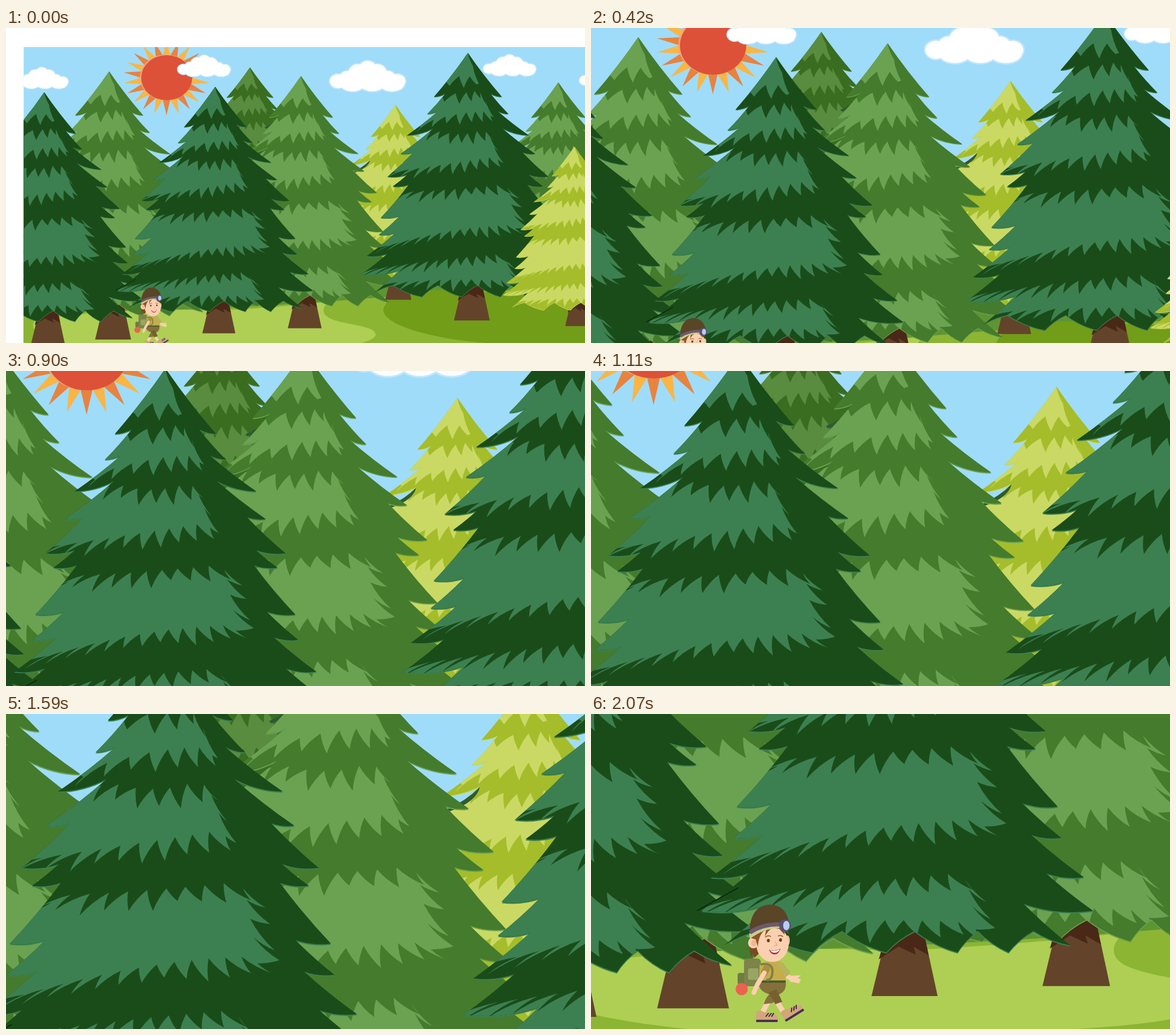
Write an HTML page that moves like this. It is 999 px wide and 545 px high and loops after 2100 ms.

```html
<!DOCTYPE html>
<html lang="en">
<head>
<meta charset="utf-8">
<title>Forest walk</title>
<style>
html, body { margin: 0; width: 100%; height: 100%; overflow: hidden; background: #fff; }
svg { display: block; width: 100%; height: 100%; }
</style>
</head>
<body>
<svg id="stage" viewBox="0 0 999 545" preserveAspectRatio="none"></svg>
<script>
const LOOP = 2100, STEP = 30, ZOOM_END = 1500;
const CENTER = [499.5, 272.5], PAN = [306, -296];

let seed = 7;
const random = () => (seed = (seed * 16807) % 2147483647) / 2147483647;
const mix = (a, b, u) => a + (b - a) * u;
const move = ([x, y]) => `M${x} ${y}`;

// Joins points with shallow curves; even and odd segments bend to opposite sides.
function jag(points, bends) {
  return points.slice(1).map(([x, y], i) => {
    const [x0, y0] = points[i], bend = bends[i % 2];
    const cx = (x0 + x) / 2 - (y - y0) * bend, cy = (y0 + y) / 2 + (x - x0) * bend;
    return `Q${cx.toFixed(1)} ${cy.toFixed(1)} ${x.toFixed(1)} ${y.toFixed(1)}`;
  }).join('');
}

// Branch tips of one side: half width, height below the apex, depth of the notch beneath.
const branches = [[108, 140, 36], [129, 195, 34], [194, 263, 84], [214, 322, 40],
  [256, 395, 63], [239, 426, 50], [277, 526, 61], [283, 580, 52], [322, 648, 65],
  [338, 706, 120], [299, 766, 0]];

function outline() {
  const side = [[0, 0]];
  for (const [x, y, inset] of branches) {
    side.push([x, y]);
    if (inset) side.push([x - inset, y - inset * (y < 300 ? 0.26 : 0.1)]);
  }
  const hem = [[299, 766]];
  for (const x of [192, 104, -19, -146, -299]) {
    hem.push([mix(hem[hem.length - 1][0], x, 0.6), 741], [x, x < -200 ? 766 : 778]);
  }
  const mirrored = side.map(([x, y]) => [-x, y]).reverse();
  return move([0, 0]) + jag(side, [0.03, -0.12]) + jag(hem, [-0.1, 0.1]) + jag(mirrored, [0.03, -0.12]);
}

// Needles hanging from the arc a-m-b, fanning away from the middle of the tree.
function fringe(a, m, b) {
  const chord = Math.hypot(b[0] - a[0], b[1] - a[1]);
  const count = chord < 60 ? 0 : Math.round(chord / 32);
  const at = (u, k) => mix(mix(a[k], 2 * m[k] - (a[k] + b[k]) / 2, u),
    mix(2 * m[k] - (a[k] + b[k]) / 2, b[k], u), u);
  const points = [a];
  for (let i = 0; i < count; i++) {
    const u = (i + 0.5) / count, next = (i + 1) / count, length = 10 + 18 * random();
    points.push([at(u, 0) * 1.28, at(u, 1) + length]);
    if (next < 1) points.push([at(next, 0), at(next, 1) - 12]);
  }
  return jag([...points, b], [0.09, -0.09]);
}

// Lit zones: upper edge from left to right, then lower edge from right to left.
const zones = [
  [[0, 2], [8, 20], [16, 42], [35, 98], [-10, 85], [-65, 97]],
  [[-80, 142], [-5, 138], [40, 127], [72, 200], [-20, 204], [-150, 238]],
  [[-119, 252], [-30, 270], [58, 251], [95, 340], [-70, 366], [-258, 395]],
  [[-205, 455], [-40, 445], [125, 430], [150, 560], [-70, 582], [-322, 648]],
  [[-347, 708], [-110, 674], [117, 652], [135, 738], [-70, 735], [-295, 750]]
];
const lit = zones.map(([a, m, b, c, n, d]) => {
  const flank = [(b[0] + c[0]) / 2, (b[1] + c[1]) / 2];
  return move(a) + fringe(a, m, b) + fringe(b, flank, c) + fringe(c, n, d) +
    `L${d[0] - 60} ${(a[1] + d[1]) / 2}Z`;
}).join('');

const foliage = outline();
const pineShape = `<clipPath id="inside"><path d="${foliage}"/></clipPath><g id="pine">
  <path fill="#63442a" d="M-16 735H44L69.500 853.500H-44.500Z"/>
  <path fill="#4a2817" d="M-16 735H44L54 783 28 768 32 782 2 768-32 790Z"/>
  <path fill="var(--light)" transform="translate(0 2)" d="${foliage}"/>
  <path fill="var(--base)" d="${foliage}"/>
  <path fill="var(--light)" clip-path="url(#inside)" d="${lit}"/></g>`;

const tones = {
  dark: ['#1a4c1a', '#3c8051'],
  green: ['#457b2c', '#6aa252'],
  olive: ['#3a6d20', '#5a8c3f'],
  lime: ['#a5bd2a', '#cad964']
};
const pine = (x, y, size, tone) => `<use href="#pine" transform="translate(${x} ${y}) scale(${size / 2})"
  style="--base:${tones[tone][0]};--light:${tones[tone][1]}"/>`;
const leaf = (x, y) => `<path fill="#2f5a33" d="M${x} ${y}q16-7 28-19q-3 13-26 21z"/>`;

const ellipse = (cx, cy, rx, ry, fill) =>
  `<ellipse cx="${cx}" cy="${cy}" rx="${rx}" ry="${ry}" fill="${fill}"/>`;

function cloudShape() {
  let puffs = '';
  for (let i = 0; i < 7; i++) {
    const x = 16 + 17 * i, rise = Math.sin(Math.PI * i / 6) ** 2;
    puffs += ellipse(x, 38 - 14 * rise, 14 + 4 * rise, 12 + 9 * rise, '#fff');
    if (i % 2) puffs += ellipse(x + 8, 43, 21, 12.5, '#fff');
  }
  return `<g id="cloud"><g stroke="#c2e6fb" stroke-width="4">${puffs}</g>${puffs}</g>`;
}
const cloud = (x, y, size) => `<use href="#cloud" transform="translate(${x} ${y}) scale(${size})"/>`;

function sun() {
  const count = 22;
  let rays = '';
  for (let i = 0; i < count; i++) {
    rays += `<path d="M-6 36L0 65 6 36Z" fill="${i % 2 ? '#fab545' : '#e8833f'}"
      transform="scale(1.150 1) rotate(${i * 360 / count})"/>`;
  }
  return `<g transform="translate(277 86)">${rays}${ellipse(-0.8, -0.5, 45, 39.5, '#f4a67c')}
    ${ellipse(0.3, 0, 44, 39, '#dd5138')}</g>`;
}

const ground = `
  <path fill="#5f9433" d="M0 430H1040V620H0Z"/>
  <path fill="#8bb533" d="M0 489Q300 495 596 470T1040 455V620H0Z"/>
  <path fill="#aecf54" d="M50 505Q200 482 360 489Q470 484 560 473Q546 480 548 491C553 515 638 510 638 531
    Q632 550 512 557Q350 567 182 557Q40 542 47 512Z"/>
  <path fill="#729d18" d="M660 470Q700 448 800 455T1040 450V620H1000Q920 548 830 545C750 540 640 515 652 483Z"/>`;

const shoe = at => `<g transform="${at}"><path fill="#d2a679" d="M0-1V-15Q8-19 14-14L30-12Q38-10 37-1Z"/>
  <path stroke="#3c2a4a" stroke-width="2" d="M17-7l4-5m1 5 4-5m1 5 3-5"/>
  <path fill="#4a2d5a" d="M0-1H37V3H0Z"/></g>`;

const hiker = `<g transform="translate(96.750 284.250) scale(.5)" fill="none" stroke-linecap="round">
  <rect x="253" y="448" width="20" height="20" rx="4" fill="#6f7a45"/>
  <rect x="264" y="423" width="29" height="48" rx="6" fill="#7d8349"/>
  <rect x="271" y="440" width="18" height="20" rx="3" fill="#97a565"/>
  ${ellipse(260, 476, 10.5, 10.5, '#ec6250')}
  <path stroke="#fbd0b0" stroke-width="9" d="M306 497L297 514M320 496L332 516"/>
  ${shoe('translate(285 530)')}${shoe('translate(335 530) rotate(-32)')}
  <path fill="#85703c" d="M289 464H336Q338 480 323 486L314 500 298 502Q303 488 308 485Q289 480 289 464Z"/>
  <path fill="#75612f" d="M306 482L320 476 330 498 318 502Z"/>
  <path stroke="#fbd0b0" stroke-width="8" d="M334 452L347 458"/>
  <path fill="#fbd0b0" d="M342 453L362 452 357 457 362 459 359 466 343 463Z"/>
  <path fill="#c5ad4c" d="M291 433Q312 423 331 430L344 449 336 455V463H290Z"/>
  <path fill="#b8b35c" d="M326 428L344 446 336 455 322 436Z"/>
  <path fill="#4c5a2a" d="M289 461H336V465H289Z"/>
  <path stroke="#7d8349" stroke-width="4" d="M294 433Q313 430 313 445T304 460"/>
  <path stroke="#a98f42" stroke-width="12" d="M303 440L299 448"/>
  <path stroke="#fbd0b0" stroke-width="8" d="M299 448L287 468 281 482"/>
  <path fill="#7a4a22" d="M275 378Q270 400 276 420L280 414 282 422 292 412V376Z"/>
  ${ellipse(339, 392, 4, 9, '#f4bf9c')}${ellipse(313, 398, 28, 31, '#fbd0b0')}
  ${ellipse(280, 396, 9, 9.5, '#fbd0b0')}${ellipse(281, 396, 4.5, 5.5, '#f0b792')}
  <path fill="#8a5628" d="M277 388Q285 363 309 364Q335 360 342 382L333 372 334 382 325 372 315 370Q306 372 300 386L302 373Q289 380 288 403L284 390Z"/>
  <path fill="#c9cf8c" d="M273 380Q305 360 335 366L335 371Q303 367 274 389Z"/>
  <path fill="#5a4526" d="M274 376C274 346 288 330 309 330S340 345 342 364Q304 358 274 376Z"/>
  <path stroke="#6e5a6e" stroke-width="7" stroke-linecap="butt" d="M274 378Q304 359 342 366"/>
  ${ellipse(335, 366, 10.5, 10.5, '#565079')}${ellipse(337, 366, 5.5, 8, '#b9cdf0')}
  ${ellipse(306, 392, 2.6, 3, '#69401f')}${ellipse(327, 391, 2.6, 3, '#69401f')}
  <path stroke="#8a5628" stroke-width="1.500" d="M301 386Q306 382 310 385M323 384Q328 382 331 385"/>
  <path stroke="#e8ac88" stroke-width="1.500" d="M318 394L321 400 316 401"/>
  <path fill="#b92f30" d="M307 408Q317 411 327 406Q324 416 316 416Q310 415 307 408Z"/>
  <path fill="#fff" d="M309 409Q317 411 326 407Q323 413 317 413Q312 413 309 409Z"/></g>`;

const stage = document.getElementById('stage');
stage.innerHTML = `<defs>${pineShape}${cloudShape()}
  <clipPath id="sheet"><path d="M30.500 33H1040V620H30.500Z"/></clipPath></defs>
  <g id="world"><g clip-path="url(#sheet)">
  <path fill="#9fdcfa" d="M0 0H1040V620H0Z"/>
  ${sun()}
  ${cloud(15, 66, 0.7)}${cloud(295, 45, 0.7)}${cloud(557, 54, 1)}${cloud(822, 44, 0.7)}${cloud(988, 64, 0.7)}
  ${ground}
  ${pine(421, 68, 0.75, 'olive')}${leaf(446, 172)}
  ${pine(953, 94, 0.87, 'green')}${pine(672, 133, 0.79, 'lime')}${leaf(600, 248)}
  ${pine(178, 75, 1.087, 'green')}${pine(509, 83, 1.023, 'green')}
  ${pine(797, 43, 1.085, 'dark')}${pine(66, 111, 1.02, 'dark')}${pine(361, 101.5, 1, 'dark')}
  <path stroke="#0b260c" d="M188 454.500L224 434.500"/>
  ${pine(981, 205, 0.728, 'lime')}
  ${hiker}</g></g>`;
const world = document.getElementById('world');

// Zoom to double size around the centre, then pan at that size.
function draw(time) {
  const step = Math.floor((time % LOOP) / STEP);
  const u = step ? (step + 1) * STEP : 0;
  const zoom = 1 + Math.min(u / ZOOM_END, 1);
  const pan = Math.max(0, (u - ZOOM_END) / (LOOP - ZOOM_END));
  const [x, y] = CENTER.map((c, i) => c * (1 - zoom) + PAN[i] * pan);
  world.setAttribute('transform', `translate(${x} ${y}) scale(${zoom})`);
}

const start = performance.now();
function tick() {
  draw(performance.now() - start);
  requestAnimationFrame(tick);
}
draw(0);
requestAnimationFrame(tick);
</script>
</body>
</html>
```
